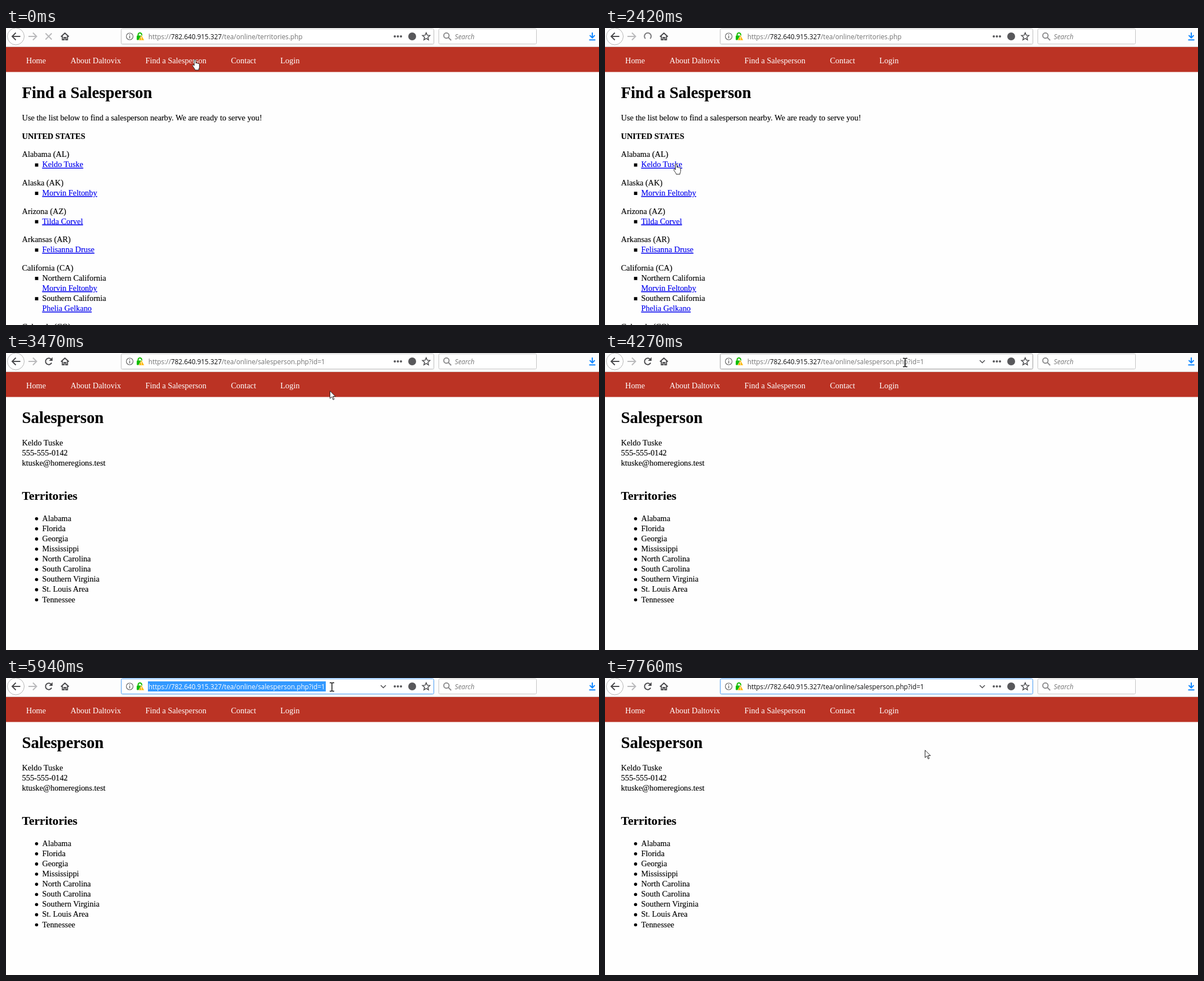
Write an HTML page that moves like this. It is 1057 px wide and 530 px high and loops after 8000 ms.

```html
<!DOCTYPE html>
<html lang="en">
<head>
<meta charset="utf-8">
<title>Find a Salesperson</title>
<style>
  html, body { margin: 0; width: 100%; height: 100%; overflow: hidden; background: #fefefe; }
  svg { display: block; }
  text { white-space: pre; font-kerning: none; }
  .page text { font: 14.4px "Liberation Serif", "Times New Roman", serif; fill: #000; stroke: #000; stroke-width: .15; }
  .page .h1 { font-size: 28.8px; font-weight: bold; }
  .page .h2 { font-size: 21.6px; font-weight: bold; }
  .page .strong { font-weight: bold; }
  .page .nav { fill: #fff; stroke: none; }
  .page .link { fill: #00e; stroke: #00e; text-decoration: underline; }
  .ui text { font: 11.8px "Open Sans", "Noto Sans", sans-serif; }
  .ui .hint { font-style: italic; fill: #777; }
  .line { fill: none; stroke: #4a4a4d; stroke-width: 2; }
  .pale { stroke: #b9b9bb; }
  .pointer { fill: #fff; stroke: #222; }
</style>
</head>
<body>
<svg width="1057" height="530" viewBox="0 0 1057 530">
  <g class="page">
    <rect y="34" width="1057" height="44.5" fill="#bb3324"/>
    <g id="nav"></g>
    <g id="list"></g>
    <g id="person"></g>
  </g>

  <g class="ui">
    <rect width="1057" height="33" fill="#fdfdfd"/>
    <rect y="33" width="1057" height="1" fill="#d3c6c4"/>
    <circle cx="17.5" cy="15" r="15" fill="#fff" stroke="#b4b4b4"/>
    <path class="line" d="M25.5 15H11M17.5 8.5L11 15l6.5 6.5"/>
    <path class="line pale" d="M40 15h14M48 8.5l6.5 6.5-6.5 6.5"/>

    <path id="stop" class="line pale" d="M70.5 9.5l11 11m0-11l-11 11"/>
    <path id="stopSmall" class="line pale" d="M72 12l8 8m0-8l-8 8"/>
    <path id="ring" class="line" style="stroke:#77777a" d="M72 19A6 6 0 1 1 80.5 19"/>
    <g id="reload">
      <path class="line" d="M81.3 17.5A5.7 5.7 0 1 1 80.3 11"/>
      <path d="M83 7.5v6.5h-6.5z" fill="#4a4a4d"/>
    </g>

    <path class="line" d="M98 15.5l7-6.5 7 6.5M100.5 14.5v6.5h3v-4h3v4h3v-6.5"/>

    <rect id="bar" x="205.5" y="1.5" width="557" height="27" rx="2" fill="#fff"
      style="filter:drop-shadow(0 1px 1px rgba(0,0,0,.08))"/>
    <circle cx="220.5" cy="15" r="6" class="line" style="stroke-width:1.2;stroke:#666"/>
    <path class="line" style="stroke-width:1.5;stroke:#666" d="M220.5 11.2v1.6M220.5 14v4.5"/>
    <path class="line" style="stroke:#12bc00" d="M235.5 15v-3a3.2 3.2 0 0 1 6.4 0v2"/>
    <rect x="233" y="13.5" width="9" height="8" rx="1" fill="#12bc00"/>
    <path d="M241.5 12.5l5 9.5h-10z" fill="#ffb400" stroke="#fff" stroke-width=".6"/>
    <path d="M241.5 16v3m0 .8v1.2" stroke="#fff" stroke-width="1.2"/>

    <rect id="mark" x="253" y="6" width="317" height="18" fill="#3399ff"/>
    <g id="urls"></g>
    <path id="caret" d="M569.5 6v18" stroke="#000"/>

    <path id="chevron" class="line" style="stroke-width:1.5" d="M668 13l4.5 4.5 4.5-4.5"/>
    <g fill="#58585b">
      <circle cx="693" cy="15" r="2"/><circle cx="698.5" cy="15" r="2"/><circle cx="704" cy="15" r="2"/>
      <circle cx="724" cy="15" r="7"/>
    </g>
    <path id="star" class="line" style="stroke-width:1.5"/>

    <rect x="771.5" y="1.5" width="174" height="27" rx="2" fill="#fff" stroke="#c4c4c4"/>
    <g class="line" style="stroke:#8c8c8e"><circle cx="785" cy="13.5" r="4.7"/><path d="M788.5 17l5 5"/></g>
    <text class="hint" x="800" y="19.7">Search</text>
    <path class="line" style="stroke:#0a84ff" d="M1045 8v9.5M1040.5 13l4.5 4.5 4.5-4.5M1039.5 21.2h11"/>
  </g>

  <g id="hand" class="pointer"><path d="M3.5 11V2a1.4 1.4 0 0 1 2.8 0v5a1.3 1.3 0 0 1 2.3.3a1.3 1.3 0 0 1 2.2.5a1.2 1.2 0 0 1 2 1v4.5c0 2-1.3 3-1.3 5.7H5c0-2-3-4.8-4.4-7.6c-.6-1.3 1-2 1.8-1.2z"/></g>
  <g id="arrow" class="pointer"><path d="M.5.8v13.3l3.2-3 2.3 5.3 2-.9-2.3-5h4.4z"/></g>
  <g id="beam"><path d="M-4-7.5h2.8l1.2.8 1.2-.8h2.8M-4 7.5h2.8l1.2-.8 1.2.8h2.8M0-7v14" fill="none" stroke="#111" stroke-width="1.5"/></g>
</svg>

<script>
const LOOP = 8000;
const $ = id => document.getElementById(id);

function add(parent, tag, attrs, text) {
  const el = document.createElementNS("http://www.w3.org/2000/svg", tag);
  for (const k in attrs) el.setAttribute(k, attrs[k]);
  if (text) el.textContent = text;
  parent.append(el);
  return el;
}
const label = (g, x, y, text, cls = "") => add(g, "text", { x, y, class: cls }, text);

// ---- Page content ----
const LINE = 18.1, GAP = 14.4;

[[36, "Home"], [115, "About Daltovix"], [248.5, "Find a Salesperson"], [401, "Contact"], [489, "Login"]]
  .forEach(([x, s]) => label($("nav"), x, 63, s, "nav"));

const list = $("list");
label(list, 28.5, 125.3, "Find a Salesperson", "h1");
label(list, 28.5, 165, "Use the list below to find a salesperson nearby. We are ready to serve you!");
label(list, 28.5, 197.6, "UNITED STATES", "strong");

let y = 230.3;
const square = () => add(list, "rect", { x: 51.7, y: y - 6.8, width: 5.8, height: 5.8 });
for (const [state, ...rows] of [
  ["Alabama (AL)", ["Keldo Tuske"]],
  ["Alaska (AK)", ["Morvin Feltonby"]],
  ["Arizona (AZ)", ["Tilda Corvel"]],
  ["Arkansas (AR)", ["Felisanna Druse"]],
  ["California (CA)", ["Morvin Feltonby", "Northern California"], ["Phelia Gelkano", "Southern California"]],
  ["Colorado (CO)"]
]) {
  label(list, 28.5, y, state);
  for (const [name, area] of rows) {
    y += LINE;
    square();
    if (area) {
      label(list, 64.5, y, area);
      y += LINE;
    }
    label(list, 64.5, y, name, "link");
  }
  y += LINE + GAP;
}

const person = $("person");
label(person, 28.5, 125.3, "Salesperson", "h1");
["Keldo Tuske", "555-555-0142", "ktuske@homeregions.test"]
  .forEach((s, i) => label(person, 28.5, 165 + i * LINE, s));
label(person, 28.5, 262.3, "Territories", "h2");
["Alabama", "Florida", "Georgia", "Mississippi", "North Carolina", "South Carolina",
  "Southern Virginia", "St. Louis Area", "Tennessee"].forEach((s, i) => {
  const base = 299.7 + i * LINE;
  add(person, "circle", { cx: 54.5, cy: base - 4, r: 2.8 });
  label(person, 64.5, base, s);
});

// ---- Address bar ----
function address(file, dim, strong) {
  const t = add($("urls"), "text", { x: 253.8, y: 19.7 });
  [["https://", dim], ["782.640.915.327", strong], ["/tea/online/" + file, dim]]
    .forEach(([s, fill]) => add(t, "tspan", { fill }, s));
  return t;
}
const listUrl = address("territories.php", "#737373", "#0c0c0d");
const page = "salesperson.php?id=1";
const idleUrl = address(page, "#737373", "#0c0c0d");
const editUrl = address(page, "#0c0c0d", "#0c0c0d");
const pickedUrl = address(page, "#fff", "#fff");

const points = Array.from({ length: 10 }, (_, i) => {
  const r = i % 2 ? 3.2 : 7, a = i * Math.PI / 5;
  return (749 + r * Math.sin(a)).toFixed(1) + " " + (15.5 - r * Math.cos(a)).toFixed(1);
});
$("star").setAttribute("d", "M" + points.join("L") + "Z");

// ---- Timing ----
function steps(el, rows) {
  const frames = rows.map(([ms, style]) => ({ offset: ms / LOOP, easing: "step-end", ...style }));
  frames.push({ ...rows[rows.length - 1][1], offset: 1 });
  el.animate(frames, { duration: LOOP, iterations: Infinity });
}

// Visible only inside the given [from, to] spans
function show(el, ...spans) {
  const rows = spans[0][0] ? [[0, { opacity: 0 }]] : [];
  for (const [from, to] of spans) {
    rows.push([from, { opacity: 1 }]);
    if (to < LOOP) rows.push([to, { opacity: 0 }]);
  }
  steps(el, rows);
}

show(list, [0, 2580]);
show(person, [2580, LOOP]);
show(listUrl, [0, 2580]);
show(idleUrl, [2580, 5790]);
show(editUrl, [5790, 5940], [6480, LOOP]);
show(pickedUrl, [5940, 6480]);
show($("mark"), [5940, 6480]);
show($("caret"), [6480, 6910], [7360, 7760]);
show($("chevron"), [4140, LOOP]);

show($("stop"), [0, 120], [2580, 2720]);
show($("stopSmall"), [120, 260], [2720, 2850]);
show($("ring"), [260, 420], [2420, 2580], [2850, 2970]);
show($("reload"), [420, 2420], [2970, LOOP]);

steps($("bar"), [[0, { stroke: "#c4c4c4" }], [4140, { stroke: "#a2a2a2" }], [5790, { stroke: "#4ba0f8" }]]);

const path = [
  [0, "hand", 332, 56], [420, "hand", 330, 56], [540, "hand", 328, 55],
  [680, "hand", 327, 54], [800, "hand", 325, 56], [920, "hand", 323, 57.5],
  [1070, "arrow", 262, 116], [1200, "beam", 213, 162],
  [1340, "arrow", 172, 196], [1460, "arrow", 142, 224], [1590, "hand", 123, 241], [1730, "hand", 122, 242],
  [2580, "arrow", 127, 241], [2720, "arrow", 138, 240], [2850, "arrow", 172, 238],
  [2970, "arrow", 222, 235], [3090, "arrow", 280, 232], [3210, "arrow", 328, 230],
  [3350, "arrow", 482, 135], [3470, "arrow", 577, 67], [3590, "arrow", 588, 45],
  [4140, "beam", 562, 21], [4260, "beam", 535, 17], [4380, "beam", 515, 13], [4510, "beam", 503, 11],
  [4650, "beam", 506, 12], [4770, "beam", 518, 13], [4890, "beam", 535, 15],
  [5010, "beam", 553, 16], [5130, "beam", 567, 17], [5250, "beam", 574.5, 17],
  [5400, "beam", 577, 17], [5520, "beam", 580, 16], [5640, "beam", 581, 16],
  [6780, "arrow", 572, 84], [6910, "arrow", 564, 130], [7060, "arrow", 570, 128]
];
for (const kind of ["hand", "arrow", "beam"]) {
  steps($(kind), path.map(([ms, k, px, py]) =>
    [ms, { opacity: +(k === kind), transform: `translate(${px}px, ${py}px)` }]));
}
</script>
</body>
</html>
```
